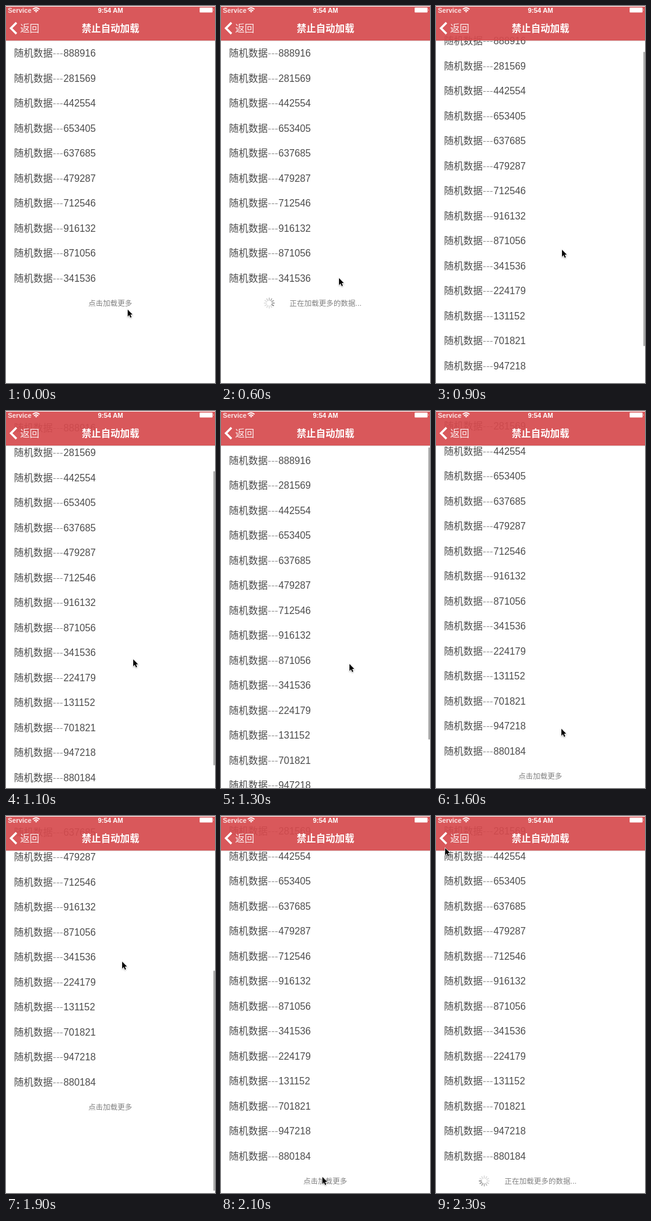
An HTML page that plays this animation: 340x611 px, repeating every 2.4 s.

```html
<!DOCTYPE html>
<html lang="zh-CN">
<head>
<meta charset="utf-8">
<style>
  html, body { margin: 0; height: 100%; overflow: hidden; background: #fff; }
  svg { display: block; width: 100%; height: 100%; }
  text { font-family: "Liberation Sans", "Noto Sans CJK SC", "Noto Sans CJK", sans-serif; }
  .row { font-size: 15.75px; font-weight: 300; fill: #4c4c4c; }
  .dash { font-family: "DejaVu Sans", sans-serif; }
  .foot { font-size: 11.9px; fill: #808080; }
  .nav { font-size: 15.6px; fill: #fff; }
  .status { font-size: 10.8px; font-weight: 700; fill: #fff; }
</style>
</head>
<body>
<svg viewBox="0 0 340 611">
  <g id="list">
    <g id="rows"></g>
    <g id="foot" class="foot">
      <text id="more" x="169.6" y="4.4" text-anchor="middle">点击加载更多</text>
      <g id="busy">
        <g id="spinner" transform="translate(78.5 0)" stroke="#555" stroke-width="1.5" stroke-linecap="round"></g>
        <text x="111.6" y="4.4">正在加载更多的数据...</text>
      </g>
    </g>
  </g>
  <rect id="bar" x="337.5" width="2.2" rx="1.1" fill-opacity=".4"/>

  <rect width="340" height="1" fill="#fff"/>
  <rect y="1" width="340" height="55" fill="rgb(214,74,78)" fill-opacity=".92"/>
  <rect y="56" width="340" height=".5" fill-opacity=".25"/>
  <text class="status" x="3" y="10.6" fill-opacity=".85">Service</text>
  <g fill="none" stroke="#fff" stroke-width="1.8">
    <path d="M43.5 5.4Q49 .6 54.5 5.4M45.6 7.8Q49 4.8 52.4 7.8"/>
    <path d="M47.2 8.8Q49 7.4 50.8 8.8L49 10.8Z" fill="#fff" stroke="none"/>
  </g>
  <text class="status" x="170" y="10.6" text-anchor="middle">9:54 AM</text>
  <path d="M316 2.5h19q1 0 1 1v6q0 1-1 1h-19q-1 0-1-1v-6q0-1 1-1zM337 5q1.5 1.5 0 3z" fill="#fff"/>
  <path d="M17 27L8 36L17 45" fill="none" stroke="#fff" stroke-width="3.4"/>
  <text class="nav" x="23" y="41.8" fill-opacity=".9">返回</text>
  <text class="nav" x="170" y="41.8" text-anchor="middle" font-weight="700">禁止自动加载</text>

  <path id="cursor" d="M0 0V11.2L2.5 8.8L4.4 13L6.2 12.2L4.4 8.1H7.8Z" stroke="#fff" stroke-width="1.2"
        paint-order="stroke" style="filter:drop-shadow(0 1px 1px rgba(0,0,0,.3))"/>
</svg>
<script>
const $ = id => document.getElementById(id);
const LOOP = 2400, STEP = 100, PITCH = 40.5, TOP = 76.5, END = 92.5;
const SPOKES = 12, CLICK = 200, LOADED = 700, CLICK_AGAIN = 2200;

const values = `888916 281569 442554 653405 637685 479287 712546 916132
  871056 341536 224179 131152 701821 947218 880184`.split(/\s+/);

// Key points: time, then the values reached there.
const cursorPath = [[0, 198, 492], [600, 192, 441], [900, 205, 395], [1300, 209, 410],
  [1600, 204, 515], [1900, 189, 236], [2100, 165, 585], [2300, 15, 52]];
const scrollPath = [[810, 0], [1040, 58], [1300, -3.5], [1500, END],
  [1600, END], [1900, END + 120], [2100, END]];

// Eases from one key point to the next and holds at both ends.
function glide(path, t) {
  const i = path.findIndex(k => k[0] > t);
  if (i < 1) return (i ? path[path.length - 1] : path[0]).slice(1);
  const [a, b] = [path[i - 1], path[i]];
  const p = (t - a[0]) / (b[0] - a[0]), e = p * p * (3 - 2 * p);
  return a.slice(1).map((v, j) => v + (b[j + 1] - v) * e);
}

$('rows').innerHTML = values.map((n, i) =>
  `<text class="row" x="13" y="${TOP + i * PITCH + 5.7}">随机数据<tspan class="dash">---</tspan><tspan x="93.5">${n}</tspan></text>`
).join('');
const rows = [...$('rows').children];

$('spinner').innerHTML = Array.from({length: SPOKES}, (_, i) =>
  `<path d="M0 -4.6V-8.2" transform="rotate(${i * 360 / SPOKES})"/>`).join('');
const spokes = [...$('spinner').children];

const show = (el, on) => el.style.display = on ? '' : 'none';
const move = (el, x, y) => el.setAttribute('transform', `translate(${x} ${y})`);

function draw(now) {
  const step = Math.floor(now % LOOP / STEP), t = step * STEP;
  const [scroll] = glide(scrollPath, t);
  const count = t < LOADED ? 10 : values.length;
  const loading = t >= CLICK && t < LOADED || t >= CLICK_AGAIN;

  move($('cursor'), ...glide(cursorPath, t));
  move($('list'), 0, -scroll);
  move($('foot'), 0, TOP + count * PITCH);
  rows.forEach((r, i) => show(r, i < count));
  show($('more'), !loading);
  show($('busy'), loading);
  spokes.forEach((s, i) => {
    const age = (step + 2 * SPOKES - 2 - i) % SPOKES;
    s.setAttribute('stroke-opacity', Math.max(.22, .8 - age * .1));
  });

  // The scroll bar shrinks while the list is pulled past either end.
  const inside = Math.min(END, Math.max(0, scroll));
  $('bar').setAttribute('y', 59 + inside * .774 + Math.max(0, scroll - END));
  $('bar').setAttribute('height', 477 - Math.abs(scroll - inside));
  show($('bar'), scroll !== 0 && scroll !== END);
}

const start = performance.now();
function tick() {
  draw(performance.now() - start);
  requestAnimationFrame(tick);
}
tick();
</script>
</body>
</html>
```
